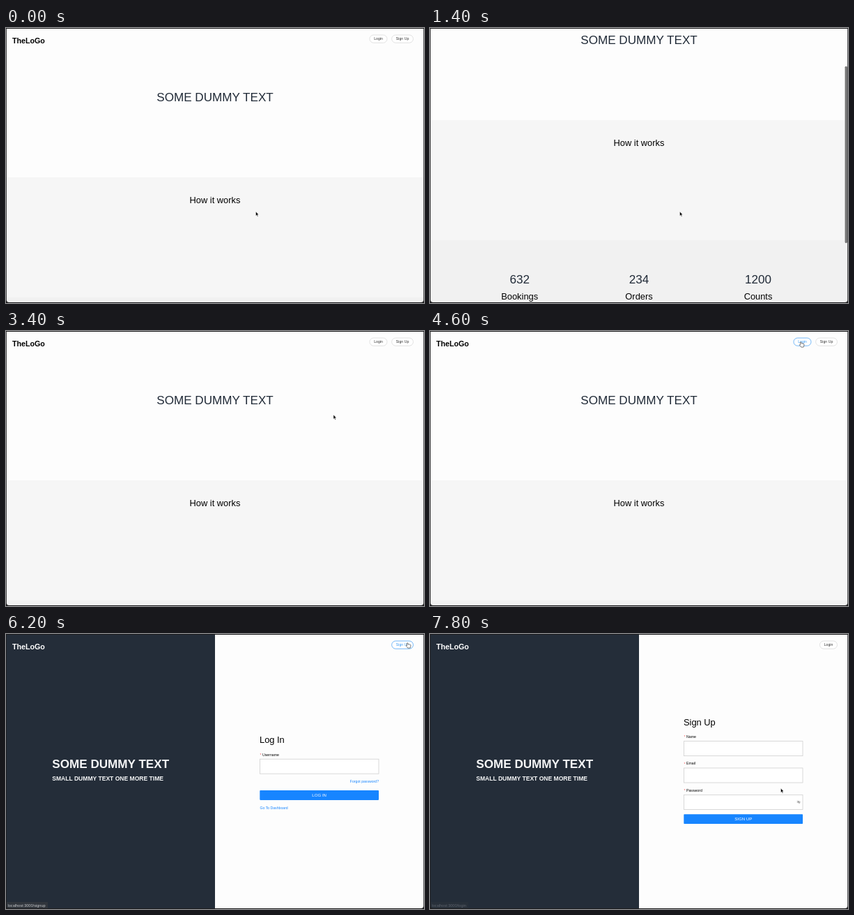
Animation, 600 px wide and 394 px high, one loop 8 s. Source, as an HTML page:

```html
<!DOCTYPE html>
<html lang="en">
<head>
<meta charset="utf-8">
<style>
html, body { margin: 0; width: 100%; height: 100%; overflow: hidden; background: #fdfdfd; }
svg { display: block; width: 600px; height: 394px; font-family: "Liberation Sans", Helvetica, Arial, sans-serif; }
.bold { font-weight: bold; }
.pill rect { fill: #fff; stroke: #d6d6d6; stroke-width: .7; }
.pill text { fill: #333; }
.pill.hover rect { stroke: #389af5; }
.pill.hover text { fill: #389af5; }
</style>
</head>
<body>
<svg viewBox="0 0 600 394">
  <g id="home"></g>
  <g id="login"></g>
  <g id="signup"></g>
  <rect id="thumb" x="595.6" width="3.4" height="253.5" rx="1.7" fill="#777"/>
  <g id="status">
    <rect id="statusBox" x="0" y="384" height="10" fill="#31363d"/>
    <text id="statusText" x="2.5" y="390.6" font-size="5.6" fill="#c4c6c9"></text>
  </g>
  <path d="M0 0H600V394H0ZM.8 1V389.5Q.8 393 4.5 393H595.5Q599.3 393 599.3 389.5V1Z" fill="#1c1c1e" fill-rule="evenodd"/>
  <g id="cursor">
    <path id="arrow" d="M0 0V6.2L1.4 4.9L2.4 7.2L3.4 6.8L2.4 4.6H4.3Z" fill="#000" stroke="#fff" stroke-width=".5"/>
    <path id="hand" d="M-.9 .6Q-.3 -.3 .4 .6L1 2.6Q1.8 2 2.3 2.6Q3.1 2.2 3.5 2.9Q4.4 2.7 4.4 3.7Q4.6 5.6 3.6 7.6H.2Q-.8 6-2 4.7Q-2 3.6-.9 4Z" fill="#fff" stroke="#222" stroke-width=".6"/>
  </g>
</svg>
<script>
const $ = id => document.getElementById(id);
const INK = '#202a37', LINK = '#1785ff', WHITE = '#f6f7f8';

const text = (s, x, y, size, fill = '#000', anchor = 'start', cls = '') =>
  `<text x="${x}" y="${y}" font-size="${size}" fill="${fill}" text-anchor="${anchor}" class="${cls}">${s}</text>`;
const rect = (x, y, w, h, fill, extra = '') =>
  `<rect x="${x}" y="${y}" width="${w}" height="${h}" fill="${fill}" ${extra}/>`;
const pill = (id, label, x, w) =>
  `<g id="${id}" class="pill">${rect(x, 10, w, 11.2, '#fff', 'rx="5.6"')}` +
  text(label, x + w / 2, 17.4, 5.2, '', 'middle') + '</g>';
const field = (label, y) =>
  text('*', 364.5, y + .4, 5.2, '#ff4d4f') + text(label, 368, y, 5.2) +
  rect(364.5, y + 4.6, 170.5, 21, '#fff', 'stroke="#d0d0d0" stroke-width=".8"');
const button = (label, y) =>
  rect(364.3, y, 170.8, 13.8, LINK, 'rx=".8"') + text(label, 449.7, y + 9.1, 6.1, '#fff', 'middle');
const split = () =>
  rect(0, 0, 600, 394, '#fdfdfd') + rect(0, 0, 300, 394, '#242d39') +
  text('TheLoGo', 9, 21.8, 10.7, '#fff', 'start', 'bold') +
  text('SOME DUMMY TEXT', 66.3, 191.6, 17.1, WHITE, 'start', 'bold') +
  text('SMALL DUMMY TEXT ONE MORE TIME', 66.3, 209.6, 8.55, WHITE, 'start', 'bold');
const stat = (count, label, x) =>
  text(count, x, 448.2, 17.1, INK, 'middle') + text(label, x, 471, 12.85, '#000', 'middle');

$('home').innerHTML =
  rect(0, 0, 600, 214, '#fdfdfd') + rect(0, 214, 600, 171.5, '#f6f6f6') +
  rect(0, 385.5, 600, 170.5, '#f1f1f1') + rect(0, 556, 600, 60, '#fdfdfd') +
  text('TheLoGo', 9, 21.8, 10.7, '#000', 'start', 'bold') +
  pill('homeLogin', 'Login', 522, 25) + pill('homeSignup', 'Sign Up', 553.7, 30.8) +
  text('SOME DUMMY TEXT', 300, 105.2, 17.1, INK, 'middle') +
  text('How it works', 300, 250.8, 12.85, '#000', 'middle') +
  stat(632, 'Bookings', 128.7) + stat(234, 'Orders', 300) + stat(1200, 'Counts', 471) +
  text('TheShape', 13, 579, 8.6, INK, 'start', 'bold');

$('login').innerHTML = split() + pill('loginSignup', 'Sign Up', 553.7, 30.8) +
  text('Log In', 364, 156, 12.85) + field('Username', 174.6) +
  text('Forgot password?', 535, 213, 5.15, LINK, 'end') + button('LOG IN', 224.1) +
  text('Go To Dashboard', 364.5, 250.6, 5.15, LINK);

$('signup').innerHTML = split() + pill('signupLogin', 'Login', 559.5, 25) +
  text('Sign Up', 364, 130.5, 12.85) +
  field('Name', 149) + field('Email', 187.4) + field('Password', 225.8) +
  '<path d="M526.8 240.8Q529.2 237.8 531.6 240.8Q529.2 243.6 526.8 240.8ZM527.3 238.6L531 243" fill="none" stroke="#888" stroke-width=".6"/>' +
  '<circle cx="529.2" cy="240.8" r=".8" fill="#888"/>' + button('SIGN UP', 258.3);

// Linear interpolation through [time, value] points.
function track(t, points) {
  const i = points.findIndex(p => p[0] > t);
  if (i === 0) return points[0][1];
  if (i < 0) return points[points.length - 1][1];
  const [t0, a] = points[i - 1], [t1, b] = points[i];
  return a + (b - a) * (t - t0) / (t1 - t0);
}

const scrollY = [[0, 0], [200, 10], [400, 95], [600, 185], [800, 212], [1000, 212],
  [1200, 172], [1400, 82], [1600, 15], [1800, 0]];
const thumbAlpha = [[0, 0], [200, 1], [1800, 1], [2200, .12], [2800, .12], [3000, 0]];
const cursorX = [[2800, 358.5], [3400, 470], [3800, 528], [4000, 538], [4400, 532.5],
  [5400, 532.5], [6200, 576.5], [7400, 576.5], [7800, 503.5]];
const cursorY = [[2800, 263], [3400, 120], [3800, 9], [4000, 5], [4400, 15.5],
  [5400, 15.5], [6200, 12.5], [7400, 12.5], [7800, 221]];
const statusAlpha = [[4600, 0], [4800, 1], [5000, 1], [5200, 0], [6000, 0], [6200, 1],
  [6400, 1], [6600, 0], [7200, 0], [7400, 1], [7600, 1], [7800, .35]];

const show = (id, on) => { $(id).style.display = on ? '' : 'none'; };
const hover = (id, on) => $(id).classList.toggle('hover', on);

function draw(now) {
  const t = Math.floor(now % 8000 / 200) * 200;
  const within = (a, b) => t >= a && t < b;

  show('home', t < 4800);
  show('login', within(4800, 6400));
  show('signup', t >= 6400);

  const y = track(t, scrollY);
  $('home').setAttribute('transform', `translate(0 ${-y})`);
  $('thumb').setAttribute('y', 1.5 + y * .648);
  $('thumb').setAttribute('opacity', track(t, thumbAlpha));

  hover('homeLogin', within(4400, 4800));
  hover('loginSignup', within(6000, 6400));
  hover('signupLogin', within(7400, 7600));

  const hand = within(4400, 4800) || within(6000, 6400) || within(7000, 7600);
  show('hand', hand);
  show('arrow', !hand);
  $('cursor').setAttribute('transform', `translate(${track(t, cursorX)} ${track(t, cursorY)})`);

  const toSignup = within(6000, 6800);
  $('statusText').textContent = 'localhost:3000/' + (toSignup ? 'signup' : 'login');
  $('statusBox').setAttribute('width', toSignup ? 60 : 55);
  $('status').setAttribute('opacity', track(t, statusAlpha));
}

const start = performance.now();
(function loop() {
  draw(performance.now() - start);
  requestAnimationFrame(loop);
})();
</script>
</body>
</html>
```
